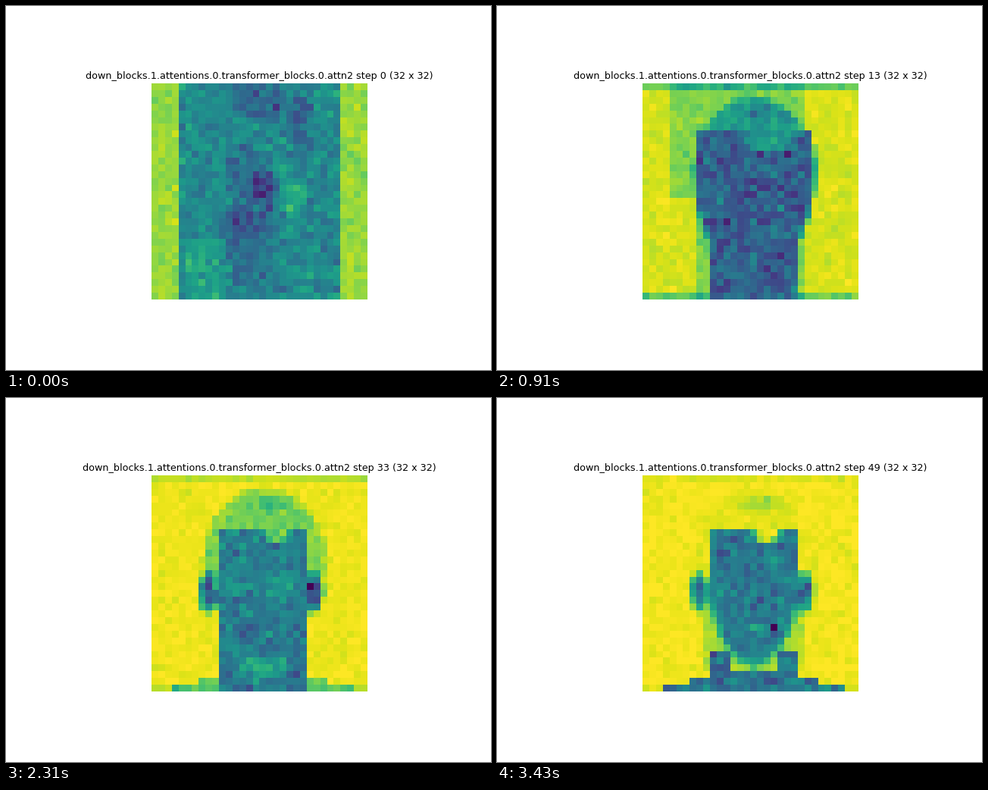
Animation of 640 by 480 pixels, one loop 3500 ms. Source, as a matplotlib script:

```python
import numpy as np
import matplotlib.pyplot as plt
from matplotlib.animation import FuncAnimation

SIZE, STEPS, DPI = 32, 50, 72
ROW, COL = np.mgrid[0:SIZE, 0:SIZE]
OFF_AXIS = abs(COL - 16)  # distance from the middle of the head

rng = np.random.default_rng(12)
STILL, DRIFT_A, DRIFT_B = rng.standard_normal((3, SIZE, SIZE))

# Dark cells that flare up and fade: row, column, step of greatest strength
SPOTS = [(16, 16, 4), (20, 12, 7), (25, 20, 21), (27, 18, 20),
         (16, 23, 33), (16, 8, 42), (16, 24, 42), (22, 19, 49)]


def ease(step, start, stop):
    u = np.clip((step - start) / (stop - start), 0, 1)
    return u * u * (3 - 2 * u)


def bump(step, center, width):
    return np.exp(-((step - center) / width) ** 2)


def ellipse(x, y, rx, ry):
    """Filled ellipse with an edge about one cell soft."""
    radius = np.hypot((COL - x) / rx, (ROW - y) / ry)
    return np.clip((1 - radius) * min(rx, ry) + .5, 0, 1)


def paint(field, mask, value, opacity=1.0):
    field += mask * opacity * (value - field)


def paint_background(field, step):
    outside = .985 - .14 * np.exp(-step / 12)
    field[:] = outside

    # The murky middle gives way from the right and the lower left
    opening = ease(step, 0, 7)
    left = 4 + 4 * opening * (ROW > 16)
    right = 27 - 4 * opening
    murk = (COL >= left) & (COL <= right)
    paint(field, murk, .47 + .06 * opening, 1 - ease(step, 4, 18))

    early = 1 - ease(step, 5, 13)
    paint(field, ellipse(15.5, 1.5, 4.5, 3), .35, early)
    paint(field, ellipse(22, 5, 2, 5), .34, early)
    paint(field, ellipse(20.5, 16.5, 2, 2.5), .64, .8 * early)
    paint(field, ellipse(8, 27, 4, 5), .64, .6 * early)

    border = (ROW == 0) | (ROW == SIZE - 1)
    field -= border * .34 * np.exp(-step / 22) * ease(step, 3, 13)


def paint_head(field, step):
    present = ease(step, 3, 13)
    hair = .54 + .42 * ease(step, 12, 49)
    skin = .43 - .13 * bump(step, 13, 7) - .09 * bump(step, 42, 6)
    narrowing = ease(step, 13, 30)

    paint(field, ellipse(16.2, 12.5, 9, 11), hair, present)
    paint(field, ellipse(17, 3.5, 3, 1), hair - .08, present)

    neck = (OFF_AXIS <= 6) & (ROW >= 20)
    paint(field, neck, skin, present)
    paint(field, (OFF_AXIS <= 7) & (ROW >= 20) & (ROW <= 28), .88, ease(step, 39, 49))

    half = 8.3 - 2 * narrowing
    jaw = ellipse(16, 12, half + .7, 15.5) * (ROW >= 8 - (step < 20)) * (OFF_AXIS <= half)
    paint(field, jaw, skin, present)
    paint(field, ellipse(18, 7.5, 4 - 2 * narrowing, 2), hair, present)

    core = 1 - ease(step, 8, 20)
    paint(field, ellipse(14, 20, 4, 11), .34, .7 * core)
    paint(field, ellipse(13, 20.5, 3, 2.5), .22, .7 * core)
    paint(field, ellipse(16, 15, 2, 2.5), .18, .7 * core)


def paint_details(field, step):
    lit = bump(step, 26, 8)
    paint(field, ellipse(11.5, 16, 2, 1.6), .57, lit)
    paint(field, ellipse(19, 16, 1.5, 2.5), .65, lit)

    ear = .26 + .14 * ease(step, 42, 49)
    for x in (8, 23.5):
        paint(field, ellipse(x, 16.8, 1.2, 2.6), ear, ease(step, 14, 26))

    paint(field, ellipse(14, 22, 1.5, .6), .08, bump(step, 39, 6))
    paint(field, ellipse(16.5, 22, 1, .5), .66, ease(step, 45, 49))
    paint(field, ellipse(21, 27, .8, 3.5), .16, bump(step, 29, 9))

    # Shoulders spread outwards below an open collar
    width = 6 + .8 * np.clip(ROW - 28, 0, None) ** 2
    shirt = (OFF_AXIS <= width) & (ROW >= 26 + 3 * (OFF_AXIS < 4))
    paint(field, shirt, .39, ease(step, 27, 42))
    paint(field, ellipse(16, 28, 3.5, 1.5), .6, ease(step, 27, 34) - ease(step, 43, 48))


def attention(step):
    field = np.empty((SIZE, SIZE))
    paint_background(field, step)
    paint_head(field, step)
    paint_details(field, step)

    angle = step / 8
    grain = .65 * STILL + .75 * (DRIFT_A * np.cos(angle) + DRIFT_B * np.sin(angle))
    field += .085 * (1.2 - field) * grain
    for row, col, peak in SPOTS:
        field[row, col] *= 1 - bump(step, peak, 7)
    return np.clip(field, 0, 1)


fig = plt.figure(figsize=(640 / DPI, 480 / DPI), dpi=DPI, facecolor="white")
ax = fig.add_axes([192 / 640, 93 / 480, 285 / 640, 285 / 480])
ax.axis("off")
image = ax.imshow(attention(0), cmap="viridis", vmin=0, vmax=1,
                  interpolation="nearest", aspect="auto")
title = ax.set_title("", fontsize=12.8, family="DejaVu Sans", pad=6.4)


def update(step):
    image.set_data(attention(step))
    title.set_text("down_blocks.1.attentions.0.transformer_blocks.0.attn2 "
                   f"step {step} (32 x 32)")
    return image, title


anim = FuncAnimation(fig, update, frames=STEPS, interval=70, repeat=True, repeat_delay=0)
plt.show()
```
